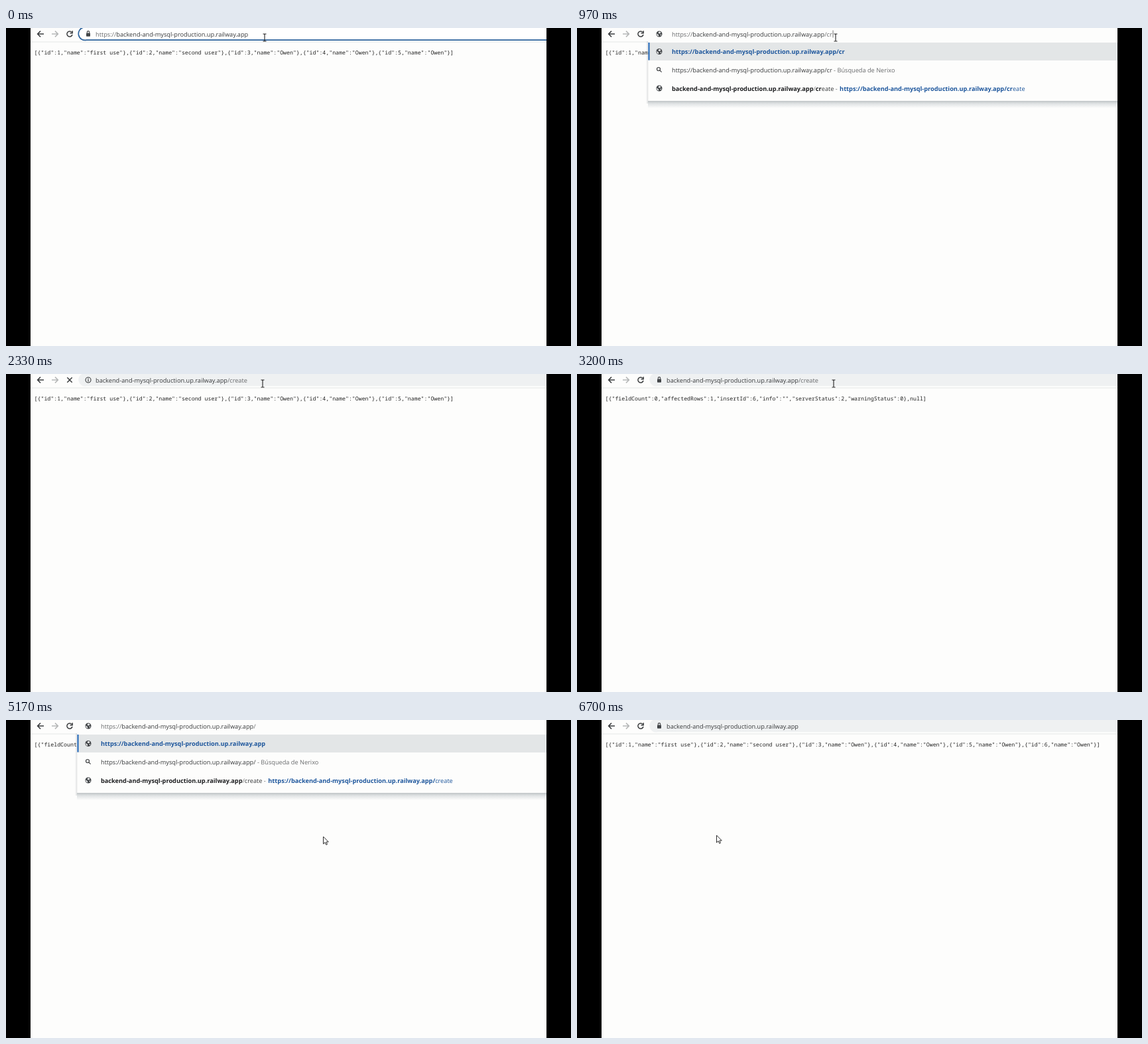
Animation of 852x480 px, one loop 6730 ms. Source, as an HTML page:

```html
<!DOCTYPE html>
<html lang="es">
<head>
<meta charset="utf-8">
<title>Address bar demo</title>
<style>
  html, body { margin: 0; width: 100%; height: 100%; overflow: hidden; background: #000; }
  svg { display: block; width: 852px; height: 480px; }
  text { font: 9.2px "Open Sans", "Noto Sans", sans-serif; fill: #686a6c; text-rendering: geometricPrecision; white-space: pre; }
  .host { fill: #37393b; }
  .bold { font-weight: 700; }
  .dark { fill: #1c1d1f; }
  .link { fill: #1d569c; }
  #json { font: 8.24px "Noto Sans Mono", "DejaVu Sans Mono", monospace; fill: #242424; }
  .line { fill: none; stroke: #3a3c3e; stroke-width: 1.5; }
</style>
</head>
<body>
<svg viewBox="0 0 852 480">
  <defs>
    <linearGradient id="down" x2="0" y2="1">
      <stop stop-color="#bfc4c6"/><stop offset=".4" stop-color="#e1e4e5"/><stop offset="1" stop-color="#fdfdfc"/>
    </linearGradient>
    <linearGradient id="left" x1="1" x2="0">
      <stop stop-color="#9a9fa3" stop-opacity=".35"/><stop offset="1" stop-color="#9a9fa3" stop-opacity="0"/>
    </linearGradient>
    <clipPath id="page"><rect x="37" width="778" height="480"/></clipPath>
    <g id="globe">
      <circle r="4.5" fill="#424548"/>
      <path d="M-3.6-.8-1 1.6-1.2 3.8C-3 3-3.8 1.4-3.6-.8ZM.2-3.8 2.6-2.6 1.2-.6-1-.9-1.4-2.2ZM1.2 1 3.4.6 2.4 2.8Z" fill="#f4f5f5"/>
    </g>
    <g id="lock">
      <rect x="-3" y="-1.5" width="6" height="5.2" rx=".7" fill="#424548"/>
      <path class="line" style="stroke-width:1.1" d="M-1.7-1.5v-1.2a1.7 1.7 0 0 1 3.4 0v1.2"/>
    </g>
    <g id="info">
      <circle class="line" r="4" style="stroke-width:1.1"/>
      <path class="line" style="stroke-width:1.2" d="M0-.7V2.4M0-2.4v1.1"/>
    </g>
    <path id="reload" class="line" d="M3.2-2.6A4.1 4.1 0 1 0 4 1M4.2-4.8V-1.2H.6"/>
    <path id="stop" class="line" d="M-3.7-3.7 3.7 3.7M3.7-3.7-3.7 3.7"/>
  </defs>
  <g clip-path="url(#page)">
    <rect x="37" width="778" height="480" fill="#fdfdfc"/>
    <rect x="37" y="20.5" width="778" height="1" fill="#e6e8e8"/>
    <path class="line" d="M57 9H47.8M52 4.6 47.6 9 52 13.4"/>
    <path class="line" style="stroke:#b4b6b6" d="M69 9h9.2M74 4.6 78.4 9 74 13.4"/>
    <use id="nav" x="96" y="9"/>
    <text id="json" x="42.6" y="39.6"></text>
    <g id="bar"></g>
    <rect id="trace" x="384.5" y="18" width="5.5" height="1.8" fill="#2a2a2a"/>
    <path id="beam" d="M-2.5-5.5H-.7L0-5 .7-5.5H2.5M0-5V5M-2.5 5.5H-.7L0 5 .7 5.5H2.5" fill="none" stroke="#222" stroke-width="1.1"/>
    <path id="arrow" d="M0 0V11L2.6 8.7 4.3 12.4 6 11.6 4.4 8H7.8Z" fill="#fff" stroke="#2c2c2c"/>
  </g>
</svg>
<script>
const LOOP = 6730;
const HOST = 'backend-and-mysql-production.up.railway.app';
const HIT = '/create';
const $ = id => document.getElementById(id);

// time, mode, typed path
const STEPS = [
  [0, 'focus', ''],
  [400, 'open', '/'], [650, 'open', '/c'], [900, 'open', '/cr'], [1250, 'open', '/cre'],
  [1450, 'open', '/crea'], [1620, 'open', '/creat'], [1850, 'open', '/create'],
  [2050, 'load', '/create'], [3000, 'idle', '/create'], [3560, 'focus', '/create'],
  [4400, 'open', '/creat'], [4520, 'open', '/crea'], [4640, 'open', '/cre'],
  [4760, 'open', '/cr'], [4880, 'open', '/c'], [5000, 'open', '/'],
  [5260, 'load', ''], [5700, 'idle', '']
];

const NAMES = ['first use', 'second user', 'Owen', 'Owen', 'Owen', 'Owen'];
const users = n => JSON.stringify(NAMES.slice(0, n).map((name, i) => ({ id: i + 1, name })));
const RESULT = JSON.stringify([{
  fieldCount: 0, affectedRows: 1, insertId: 6, info: '', serverStatus: 2, warningStatus: 0
}, null]);

const span = (cls, s) => `<tspan class="${cls}">${s}</tspan>`;
const text = (x, y, body, cls = '') => `<text x="${x}" y="${y}" class="${cls}">${body}</text>`;
const icon = (name, y) => `<use href="#${name}" x="124" y="${y}"/>`;

function field(mode, path) {
  const focus = mode === 'focus';
  const fill = focus ? '#fff' : '#eff1f2';
  const edge = focus ? 'stroke="#2c629c" stroke-width="1.7"' : '';
  const url = (focus ? 'https://' : '') + span('host', HOST) + path;
  return `<path d="M820 18.2H121.3A9.4 9.4 0 0 1 117-1H820" fill="${fill}" ${edge}/>`
    + icon(mode === 'load' ? 'info' : 'lock', 9) + text(135, 12.6, url);
}

function dropdown(path) {
  const typed = path.slice(1), rest = HIT.slice(path.length);
  const url = 'https://' + span('host', HOST) + path;
  const first = 'https://' + HOST + (typed ? path : '');
  const linkX = 395.3 + typed.length * 0.4;
  return `<rect x="104" y="20" width="3.5" height="94" fill="url(#left)"/>
    <rect x="107" y="110" width="711" height="11" fill="url(#down)"/>
    <rect x="107.5" width="711" height="110" fill="#fdfdfc"/>
    <rect x="107.5" y="22" width="711" height="27" fill="#e3e6e7"/>
    <rect x="107.5" y="22" width="2" height="26.5" fill="#1f66b8"/>`
    + icon('globe', 9) + icon('globe', 35.5) + icon('globe', 91)
    + `<g class="line" style="stroke-width:1.2"><circle cx="123" cy="62" r="2.5"/><path d="M124.9 63.9 127.6 66.6"/></g>`
    + text(143, 12.6, url, 'url')
    + text(143, 39, first, 'bold link')
    + text(143, 66.6, span('host', 'https://' + HOST + path) + ' - Búsqueda de Nerixo')
    + text(143, 94.5, span('bold dark', HOST) + '/' + span('bold dark', typed) + span('host', rest) + ' -')
    + text(linkX, 94.5, span('bold', 'https://' + HOST + path) + rest, 'link');
}

function show([time, mode, path]) {
  const open = mode === 'open';
  $('bar').innerHTML = open ? dropdown(path) : field(mode, path);
  $('nav').setAttribute('href', mode === 'load' ? '#stop' : '#reload');
  $('json').textContent = time < 3000 ? users(5) : time < 5700 ? RESULT : users(6);
  if (open && path.length > 1) {
    const x = 143.8 + $('bar').querySelector('.url').getComputedTextLength();
    $('bar').insertAdjacentHTML('beforeend', `<rect x="${x}" y="3.5" width="1" height="11" fill="#777"/>`);
  }
}

function ease(t, from, to) {
  const p = Math.min(1, Math.max(0, (t - from) / (to - from)));
  return p * p * (3 - 2 * p);
}

function movePointer(t) {
  const down = ease(t, 3620, 4050), back = ease(t, 5740, 6600);
  const beam = t < 3680;
  $('beam').style.display = beam ? '' : 'none';
  $('arrow').style.display = beam ? 'none' : '';
  $('trace').style.display = t >= 3680 && t < 4400 ? '' : 'none';
  const x = 390 - 3 * ease(t, 2080, 2300);
  $('beam').setAttribute('transform', `translate(${x + 91.5 * down} ${14.5 + 161.5 * down})`);
  $('arrow').setAttribute('transform', `translate(${387 + 91.5 * down - 268 * back} ${14.5 + 161.5 * down - 2 * back})`);
}

let current;
const start = performance.now();
function frame() {
  const t = (performance.now() - start) % LOOP;
  const step = STEPS.findLast(s => s[0] <= t);
  if (step !== current) show(current = step);
  movePointer(t);
  requestAnimationFrame(frame);
}
frame();
</script>
</body>
</html>
```
